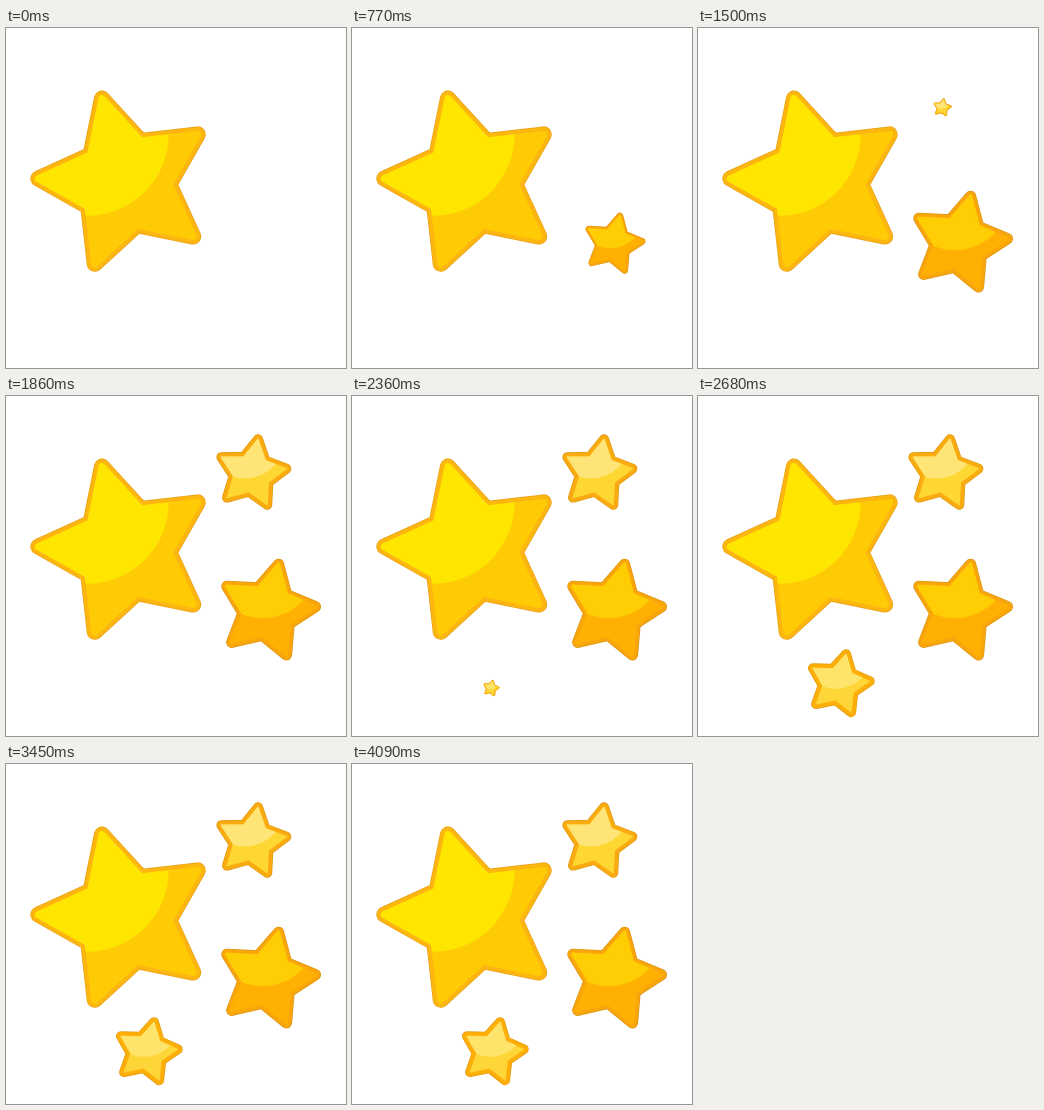
An HTML page with a canvas for the animation above (4.13 s loop, 340x340 px).

```html
<!DOCTYPE html>
<html>
<head>
<meta charset="utf-8">
<style>
html, body { margin: 0; width: 100%; height: 100%; overflow: hidden; background: #fff; }
canvas { display: block; width: 340px; height: 340px; }
</style>
</head>
<body>
<canvas id="stage"></canvas>
<script>
const LOOP = 4130;
const GROWTH = 0.0024; // scale gained per millisecond
const REACH = 94.5, NOTCH = 44;
const CONTOUR = 0.7; // thin darker edge, in pixels

// Shine, round (corner radius) and edge (rim width) are in star units, before scaling.
const stars = [
  { x: 119.2, y: 154.4, size: 1.005, tilt: -15.5, round: 8, edge: 4.5, start: -Infinity, from: [119, 154],
    shine: { x: -37, y: -47, r: 80 }, light: '#ffe600', shade: '#ffcb04', rim: '#fdb610', dark: '#e5a014' },
  { x: 261.8, y: 214.9, size: 0.565, tilt: 13, round: 10, edge: 7, start: 520, from: [261, 217.5],
    shine: { x: -9, y: -84, r: 97 }, light: '#ffcd04', shade: '#ffb003', rim: '#f8a60c', dark: '#dd9312' },
  { x: 246, y: 77.5, size: 0.42, tilt: 10, round: 12, edge: 10.5, start: 1400, from: [243.7, 80.3],
    shine: { x: -17, y: -83, r: 95 }, light: '#ffe578', shade: '#ffd732', rim: '#faab10', dark: '#dd9812' },
  { x: 141.2, y: 288, size: 0.377, tilt: 13, round: 13, edge: 12, start: 2260, from: [138.4, 293.6],
    shine: { x: -9, y: -84, r: 97 }, light: '#ffe46c', shade: '#ffd638', rim: '#fdae08', dark: '#e29c10' }
];

const canvas = document.getElementById('stage');
const ctx = canvas.getContext('2d');
const ratio = window.devicePixelRatio || 1;
canvas.width = canvas.height = 340 * ratio;

function starPath(tilt, tip) {
  const path = new Path2D();
  for (let i = 0; i < 10; i++) {
    const angle = (tilt - 90 + i * 36) * Math.PI / 180;
    const radius = i % 2 ? NOTCH : tip;
    path.lineTo(radius * Math.cos(angle), radius * Math.sin(angle));
  }
  path.closePath();
  return path;
}

function paint(path, color, margin) {
  ctx.fillStyle = ctx.strokeStyle = color;
  ctx.lineWidth = margin * 2;
  ctx.fill(path);
  ctx.stroke(path);
}

function drawStar(star, time) {
  const grow = Math.min(1, (time - star.start) * GROWTH);
  if (grow <= 0) return;
  const [fromX, fromY] = star.from;
  const { round, edge } = star;
  const { x, y, r } = star.shine;
  const scale = star.size * grow;
  const path = starPath(star.tilt, REACH - round);
  ctx.save();
  ctx.translate(fromX + (star.x - fromX) * grow, fromY + (star.y - fromY) * grow);
  ctx.scale(scale, scale);
  ctx.lineJoin = 'round';
  paint(path, star.dark, round);
  paint(path, star.rim, round - CONTOUR / star.size);
  paint(path, star.shade, round - edge);
  ctx.beginPath();
  ctx.arc(x, y, r, 0, Math.PI * 2);
  ctx.clip();
  paint(path, star.light, round - edge);
  ctx.restore();
}

// Poses hold for 90 ms, with a shorter 50 ms hold closing each half second.
function heldTime(time) {
  const within = time % 500;
  return time - within + Math.floor(within / 90) * 90;
}

function draw(time) {
  ctx.setTransform(ratio, 0, 0, ratio, 0, 0);
  ctx.fillStyle = '#fff';
  ctx.fillRect(0, 0, 340, 340);
  for (const star of stars) drawStar(star, time);
}

const begin = performance.now();
function tick() {
  draw(heldTime((performance.now() - begin) % LOOP));
  requestAnimationFrame(tick);
}
tick();
</script>
</body>
</html>
```
